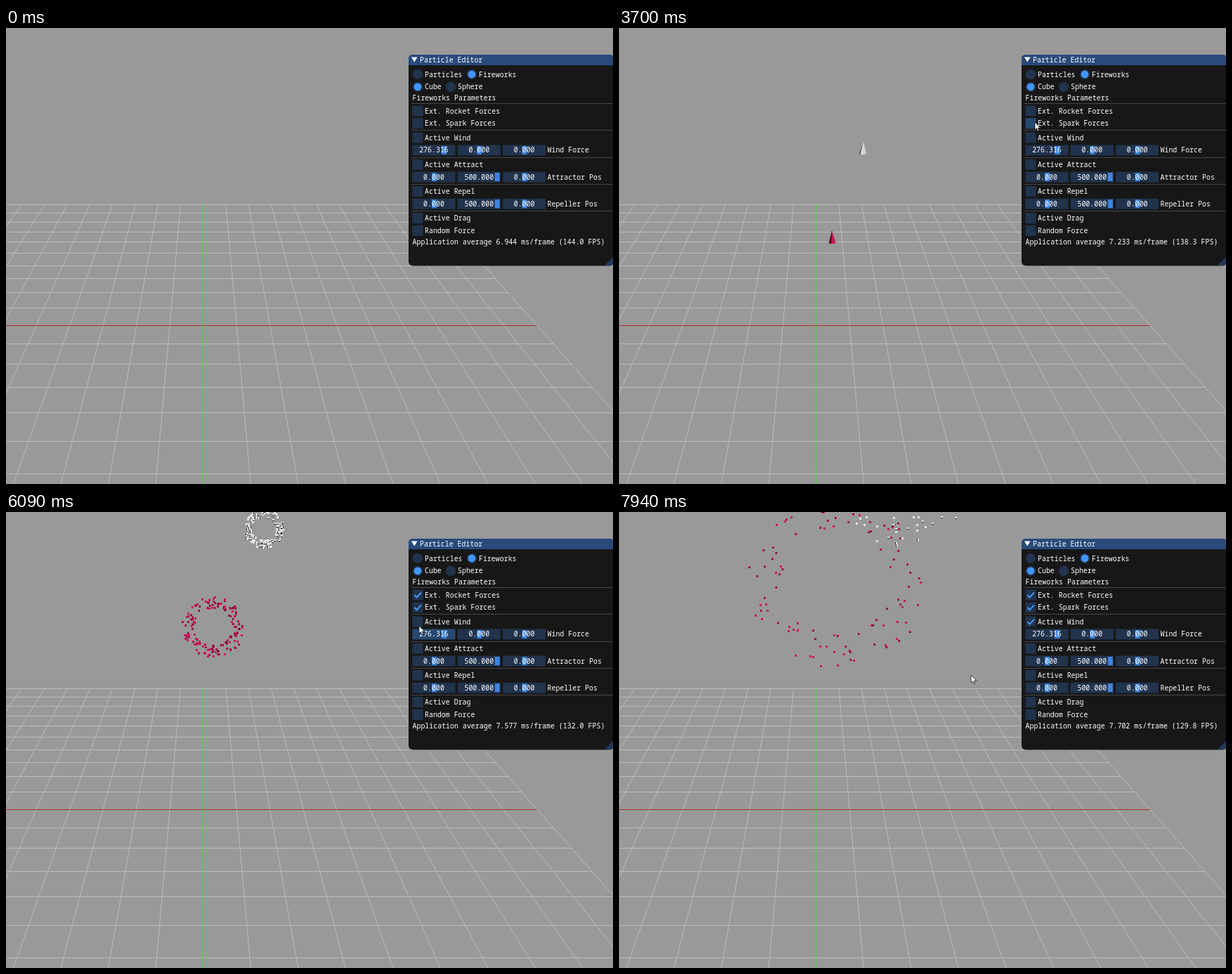
Write an HTML page that moves like this. It is 864x649 px and loops after 8 s.

```html
<!DOCTYPE html>
<html lang="en">
<head>
<meta charset="utf-8">
<title>Particle Editor</title>
<style>
  html, body { margin: 0; width: 100%; height: 100%; overflow: hidden; background: #999; }
  svg { display: block; width: 100%; height: 100%; }
  text { font: 9.93px "Noto Sans Mono", "DejaVu Sans Mono", monospace; fill: #fff; white-space: pre; }
</style>
</head>
<body>
<svg id="stage" viewBox="0 0 864 649"></svg>
<script>
const LOOP = 8000;
const FRAME = '#21334d', HOVER = '#284a72', MARK = '#4296fa', GRAB = '#3d85e0';
const stage = document.getElementById('stage');

function add(tag, attrs) {
  const el = document.createElementNS('http://www.w3.org/2000/svg', tag);
  for (const k in attrs) el.setAttribute(k, attrs[k]);
  return stage.appendChild(el);
}

function label(str, x, mid, anchor = 'start') {
  const el = add('text', { x, y: mid + 3.5, 'text-anchor': anchor });
  el.textContent = str;
  return el;
}

const box = (x, y, width, height, fill) => add('rect', { x, y, width, height, fill });
const show = (el, on) => el.setAttribute('visibility', on ? 'visible' : 'hidden');
const linear = u => u;
const smooth = u => u * u * (3 - 2 * u);

// Interpolates rows of [time, ...values].
function track(keys, t, ease = linear) {
  let i = 1;
  while (i < keys.length - 1 && t > keys[i][0]) i++;
  const [t0, ...a] = keys[i - 1], [t1, ...b] = keys[i];
  const u = ease(Math.max(0, Math.min(1, (t - t0) / (t1 - t0))));
  return a.map((v, k) => v + (b[k] - v) * u);
}

function random(seed) {
  return () => (seed = (seed * 16807) % 2147483647) / 2147483647;
}

// Ground plane: 21 by 21 lines in perspective.
function project(col, row) {
  const depth = 21.22 - row;
  return [280.7 + 1008 * col / depth, Math.round(11376 / depth - 113.5) + 0.5];
}
function gridLine(c0, r0, c1, r1, stroke) {
  add('path', { d: `M${project(c0, r0)}L${project(c1, r1)}`, stroke });
}
for (let i = -10; i <= 10; i++) {
  if (!i) continue;
  gridLine(-10, i, 10, i, '#bcbcbc');
  gridLine(i, -10, i, 10, '#bcbcbc');
}
gridLine(-10, 0, 10, 0, '#b02e2e');
add('path', { d: 'M280.5 251V649', stroke: '#34dc28' });

// A rocket climbs with slight drag, then bursts into a ring of sparks.
function makeRocket(o) {
  const body = add('path', {}), shade = add('path', { fill: o.dark });
  const crisp = { 'shape-rendering': 'crispEdges' };
  const sparks = add('path', { fill: o.color, ...crisp });
  const edges = add('path', { fill: o.dark, ...crisp });
  const rnd = random(o.seed);
  const parts = Array.from({ length: o.count }, () => ({
    angle: rnd() * Math.PI * 2,
    reach: 0.6 + 0.4 * rnd(),
    life: 800 + 7000 * rnd(),
    side: Math.floor(rnd() * 5)
  }));

  function apex(t) {
    const s = t - o.ref;
    return [o.x + o.vx * s, o.y - o.vy * s + 2.25e-6 * s * s];
  }

  function cone(t) {
    const [x, y] = apex(t);
    const h = Math.min(20, 16 + t / 1200);
    const at = f => `${x + o.lean + 10 * (f - 0.5)} ${y + h - 1 + Math.sin(f * Math.PI)}`;
    const { fill, dark } = o.light(t);
    body.setAttribute('d', `M${x} ${y}L${at(0)}L${at(0.5)}L${at(1)}Z`);
    body.setAttribute('fill', fill);
    shade.setAttribute('d', `M${x} ${y}L${at(0)}L${at(dark)}Z`);
  }

  function burst(t) {
    const age = t - o.end, [cx, cy] = apex(t);
    const wind = 1e-5 * Math.max(0, t - 6500) ** 2;
    const fall = 3.6e-6 * age * age;
    let light = '', dim = '';
    for (const p of parts) {
      if (age > p.life) continue;
      const r = o.speed * age * p.reach;
      const x = Math.round(cx + wind + r * Math.cos(p.angle)) - 1;
      const y = Math.round(cy + 10 + fall + 0.97 * r * Math.sin(p.angle)) - 1;
      light += `M${x} ${y}h3v3h-3z`;
      if (p.side < 2) dim += `M${x + 2 * p.side} ${y}h1v3h-1z`;
      if (p.side === 2) dim += `M${x} ${y + 2}h3v1h-3z`;
    }
    sparks.setAttribute('d', light);
    edges.setAttribute('d', dim);
  }

  return t => {
    const done = t >= o.end, flying = t >= o.start && !done;
    [body, shade].forEach(el => show(el, flying));
    [sparks, edges].forEach(el => show(el, done));
    if (flying) cone(t);
    if (done) burst(t);
  };
}

const rockets = [
  makeRocket({
    color: '#e2e7e2', dark: '#303330', seed: 4177, count: 115,
    start: 250, end: 5400, speed: 0.041,
    ref: 1250, x: 329, y: 341, vx: 0.0078, vy: 0.0789, lean: -1.4,
    light(t) {
      const gloom = Math.min(1, Math.exp((1250 - t) / 900));
      const v = Math.round(214 - 46 * gloom);
      return { fill: `rgb(${v},${v + 3},${v})`, dark: 0.12 + 0.38 * gloom };
    }
  }),
  makeRocket({
    color: '#c8185a', dark: '#4a0c26', seed: 90211, count: 145,
    start: 1690, end: 5100, speed: 0.045,
    ref: 2900, x: 306, y: 340, vx: -0.0036, vy: 0.0666, lean: 0.6,
    light: () => ({ fill: '#c8185a', dark: 0.35 })
  })
];

// Editor window.
add('rect', { x: 573, y: 38, width: 292, height: 300.5, rx: 6, fill: '#171717' });
add('path', { d: 'M573 53V44Q573 38 579 38H860Q864 38 864 42V53Z', fill: '#294a7a' });
add('path', { d: 'M852 338L864 326V334Q864 338 860 338Z', fill: '#22395a' });
add('path', { d: 'M577 41.5H585.5L581.25 48.5Z', fill: '#fff' });
label('Particle Editor', 589, 45.5);

function radio(str, cx, cy, on) {
  add('circle', { cx, cy, r: 7.2, fill: FRAME });
  if (on) add('circle', { cx, cy, r: 5.4, fill: MARK });
  label(str, cx + 10, cy);
}
radio('Particles', 586, 66, false);
radio('Fireworks', 663, 66, true);
radio('Cube', 586, 83.8, true);
radio('Sphere', 633, 83.8, false);
label('Fireworks Parameters', 578.5, 99.7);

const items = [];
let mid = 115.45;

function separator() {
  mid += 2.55;
  add('path', { d: `M577 ${Math.floor(mid - 10.2) + 0.5}H864`, stroke: '#46464c' });
}

function checkbox(str, time = Infinity) {
  const el = box(578.5, mid - 7.5, 15, 15, FRAME);
  const tick = add('path', {
    d: `M581.3 ${mid}l3.3 3.5 6.4 -7`, fill: 'none', stroke: MARK, 'stroke-width': 2
  });
  label(str, 596, mid);
  items.push({ el, tick, time, x: 578, end: 596 + str.length * 6, mid });
  mid += 17.8;
}

// Three sliders, each from -500 to 500.
function vector(name, ...values) {
  values.forEach((value, i) => {
    const x = 578.5 + 64.3 * i;
    const el = box(x, mid - 7.5, 61, 15, FRAME);
    box(x + 2 + 51 * (value + 500) / 1000, mid - 6, 7, 12, GRAB);
    label(value.toFixed(3), x + 30.5, mid, 'middle');
    items.push({ el, x, end: x + 61, mid });
  });
  label(name, 770.5, mid);
  mid += 17.8;
}

separator();
checkbox('Ext. Rocket Forces', 4950);
checkbox('Ext. Spark Forces', 4200);
separator();
checkbox('Active Wind', 6500);
vector('Wind Force', 276.316, 0, 0);
separator();
checkbox('Active Attract');
vector('Attractor Pos', 0, 500, 0);
separator();
checkbox('Active Repel');
vector('Repeller Pos', 0, 500, 0);
separator();
checkbox('Active Drag');
checkbox('Random Force');
const stats = label('', 578.5, 304.5);

const cursor = add('path', {
  d: 'M0 0V11L2.5 8.8 4.2 12.8 6 12 4.3 8.1H7.7Z',
  fill: '#fff', stroke: '#111', 'stroke-width': 0.8
});

// Stops of the mouse: time, x, y.
const pointer = [
  [300, 440, 597], [900, 453, 483], [1450, 453, 483], [2900, 618, 164],
  [3900, 589, 131], [4600, 589, 131], [4950, 588, 113], [6090, 588, 162],
  [6500, 586, 151], [7210, 490, 246], [7940, 501, 232]
];
// Turning points of the frame time in ms.
const load = [
  [70, 6.944], [1250, 7.292], [2900, 7.178], [4570, 7.292],
  [6090, 7.577], [7210, 7.815], [7940, 7.702]
];

function draw(t) {
  rockets.forEach(update => update(t));

  const shown = t >= pointer[0][0];
  const [mx, my] = track(pointer, t, smooth).map(Math.round);
  cursor.setAttribute('transform', `translate(${mx} ${my})`);
  show(cursor, shown);

  for (const it of items) {
    const over = shown && mx >= it.x && mx <= it.end && Math.abs(my + 4 - it.mid) <= 8.5;
    it.el.setAttribute('fill', over ? HOVER : FRAME);
    if (it.tick) show(it.tick, t >= it.time);
  }

  const [ms] = track(load, t);
  stats.textContent =
    `Application average ${ms.toFixed(3)} ms/frame (${(1000 / ms).toFixed(1)} FPS)`;
}

const begin = performance.now();
function tick() {
  draw((performance.now() - begin) % LOOP);
  requestAnimationFrame(tick);
}
tick();
</script>
</body>
</html>
```
